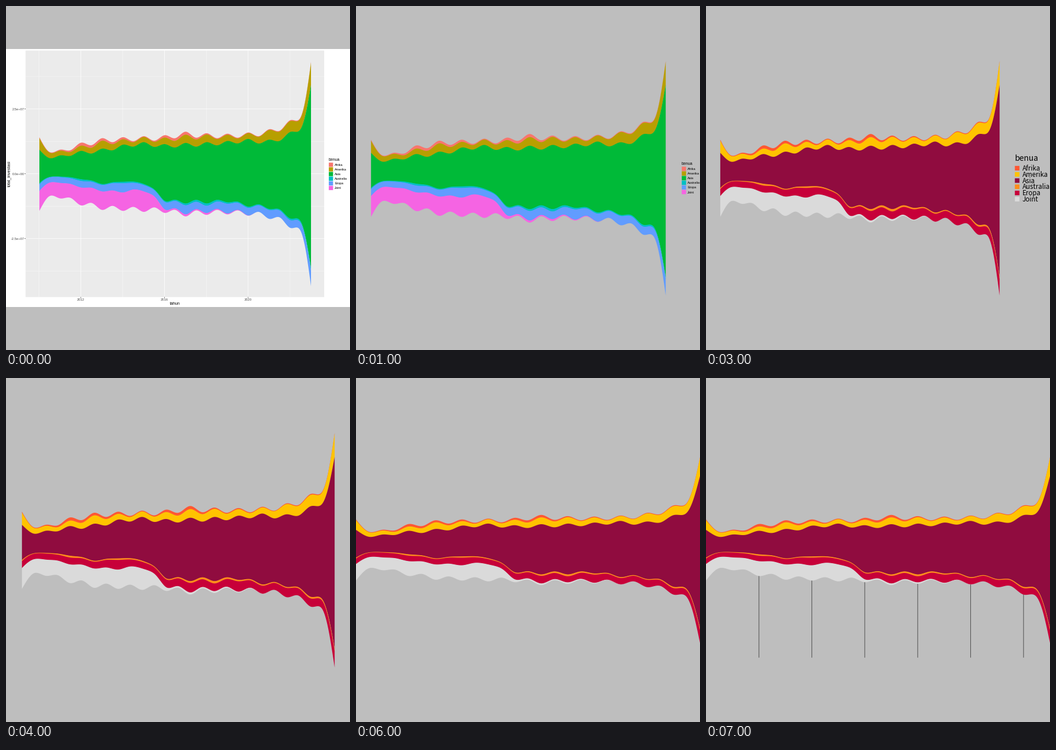
A matplotlib script that plays this animation: 600x600 px, repeating every 8 s.

```python
import numpy as np
import matplotlib.pyplot as plt
from matplotlib.animation import FuncAnimation
from matplotlib.patches import Rectangle

SIZE, DPI = 600, 100
GREY = "#BEBEBE"
NAMES = ["Afrika", "Amerika", "Asia", "Australia", "Eropa", "Joint"]
HUES = ["#F8766D", "#B79F00", "#00BA38", "#00BFC4", "#619CFF", "#F564E3"]
WARM = ["#FF5733", "#FFC300", "#900C3F", "#FF8D1A", "#C70039", "#DADADA"]
FIRST, LAST = 2010, 2023
PEAK = 43.2e6


def spline(x, knots, vals):
    """Natural cubic spline through (knots, vals)."""
    k, v = np.asarray(knots, float), np.asarray(vals, float)
    h, n = np.diff(k), len(k)
    m, rhs = np.eye(n), np.zeros(n)
    for i in range(1, n - 1):
        m[i, i - 1:i + 2] = h[i - 1], 2 * (h[i - 1] + h[i]), h[i]
        rhs[i] = 6 * ((v[i + 1] - v[i]) / h[i] - (v[i] - v[i - 1]) / h[i - 1])
    c = np.linalg.solve(m, rhs)
    i = np.clip(np.searchsorted(k, x) - 1, 0, n - 2)
    a, b, w = k[i + 1] - x, x - k[i], h[i]
    return ((c[i] * a**3 + c[i + 1] * b**3) / (6 * w)
            + (v[i] / w - c[i] * w / 6) * a
            + (v[i + 1] / w - c[i + 1] * w / 6) * b)


def even(vals):
    return spline(years, np.linspace(FIRST, LAST, len(vals)), vals)


years = np.linspace(FIRST, LAST, 1000)

# Half of the total height, 225 at its largest
half_knots = np.append(np.arange(FIRST, 2022.1, 0.5), [2022.25, 2022.5, 2022.75, 2023])
half = spline(years, half_knots, [
    74, 44, 49, 48, 63, 58, 72, 64, 74, 66, 76, 67, 78, 72, 85, 73, 82, 72,
    81, 73, 83.5, 76, 90, 87, 108, 107.5, 114, 154, 225]) / 225

# Borders between the bands as shares of the half height
amerika = even([.975, .96, .905, .93, .945, .98, .94, .93, .97, .975, .985,
                .985, .984, .994])
asia = even([.66, .765, .738, .708, .797, .842, .77, .735, .78, .82, .844,
             .767, .782, .796])
australia = even([-.25, -.13, -.102, -.135, -.165, -.225, -.278, -.258, -.21,
                  -.23, -.263, -.46, -.69, -.715, -.695, -.71, -.72, -.72,
                  -.70, -.76, -.785, -.80, -.78, -.815, -.825, -.832, -.84])
eropa = australia - even([.03, .025, .055, .025, .04, .028, .026, .042, .055,
                          .035, .028, .022, .03, .02])
joint = even([-.46, -.39, -.365, -.415, -.43, -.475, -.485, -.515, -.50, -.47,
              -.46, -.67, -.91, -.955, -.952, -.965, -.955, -.97, -.98, -.985,
              -.995] + [-1] * 6)
joint = np.maximum(joint, -1)
one = np.ones_like(years)
borders = half * np.array([one, amerika, asia, australia, eropa, joint, -one])

fig = plt.figure(figsize=(SIZE / DPI, SIZE / DPI), dpi=DPI, facecolor=GREY)
ax = fig.add_axes([0, 0, 1, 1])


def text(x, y, s, px, color="black", font="Liberation Sans", **kw):
    ax.text(x, y, s, fontsize=px * 72 / DPI, color=color, family=font,
            **{"va": "baseline", **kw})


def line(xs, ys, px, color, z=1):
    ax.plot(xs, ys, color=color, lw=px * 72 / DPI, solid_capstyle="butt",
            zorder=z, snap=False)


def box(x0, y0, x1, y1, color):
    ax.add_patch(Rectangle((x0, y0), x1 - x0, y1 - y0, fc=color, lw=0, snap=False))


def year_x(year, x0, x1):
    return x0 + (year - FIRST) / (LAST - FIRST) * (x1 - x0)


def stream(x0, x1, mid, tall, colors):
    x = year_x(years, x0, x1)
    y = mid - tall * borders
    for top, low, color in zip(y, y[1:], colors):
        # small overlap hides seams between bands
        ax.fill_between(x, top, np.minimum(low + 0.5, y[-1]), color=color, lw=0, zorder=3)


def legend(x, title_y, first, step, key, gap, px, title_px, colors,
           font="Liberation Sans", back=None):
    text(x, title_y, "benua", title_px, font=font)
    for i, (name, color) in enumerate(zip(NAMES, colors)):
        y = first + i * step
        if back:
            box(x, y - step / 2, x + step, y + step / 2, back)
        left = x + 0.4
        box(left, y - key / 2, left + key, y + key / 2, color)
        text(x + gap, y + 0.36 * px, name, px, font=font)


def chart():
    x0, x1, mid, tall = 57.7, 531.5, 292.6, 195.4
    left, right, top, low = 34.2, 555, 77.7, 507.6
    unit = tall / PEAK
    box(0, 75, SIZE, 525, "white")
    box(left, top, right, low, "#EBEBEB")
    for year in range(2010, 2023, 2):
        x = year_x(year, x0, x1)
        major = year % 4 == 0
        line([x, x], [top, low], 0.75 if major else 0.38, "white")
        if major:
            line([x, x], [low, low + 1.8], 0.75, "#333333")
            text(x, 514, str(year), 5.85, "#4D4D4D", ha="center")
    for k in range(-3, 4):
        y = mid - k * 1.25e7 * unit
        major = k % 2 == 0
        line([left, right], [y, y], 0.75 if major else 0.38, "white")
        if major:
            line([left - 1.8, left], [y, y], 0.75, "#333333")
            text(31.8, y + 2.1, f"{k * 1.25e7:.1e}", 5.85, "#4D4D4D", ha="right")
    text(294.6, 521, "tahun", 7.1, ha="center")
    text(5.4, mid, "total_investasi", 7.1, ha="center", va="center", rotation=90)
    stream(x0, x1, mid, tall, HUES)
    legend(562.7, 269.8, 276.9, 8.1, 7.3, 10.3, 5.8, 7, HUES, back="#F2F2F2")


def bare():
    stream(25.7, 539.7, 300, 204.5, HUES)
    legend(567.8, 276.8, 284, 8.1, 7.5, 10.4, 5.8, 7, HUES)


def big_legend(colors):
    stream(24.4, 511.6, 300, 204.5, colors)
    legend(538.3, 270, 282.9, 10.8, 8, 13.8, 11.6, 13.9, colors,
           font="Noto Sans CJK JP")


def no_legend():
    stream(27.3, 572.7, 300, 204.5, WARM)


def full():
    stream(0, SIZE, 300, 225, WARM)


def lowered():
    stream(0, SIZE, 300, 162, WARM)


def marked():
    for year in range(2012, 2023, 2):
        x = year_x(year, 0, SIZE)
        line([x, x], [300, 487.7], 1, "#4D4D4D", z=2)
    lowered()


SCENES = [chart, bare, lambda: big_legend(HUES), lambda: big_legend(WARM),
          no_legend, full, lowered, marked]


def draw(i):
    ax.clear()
    ax.set(xlim=(0, SIZE), ylim=(SIZE, 0), autoscale_on=False)
    ax.axis("off")
    SCENES[i]()
    return []


anim = FuncAnimation(fig, draw, frames=len(SCENES), interval=1000,
                     init_func=lambda: [], repeat=True, repeat_delay=0)
plt.show()
```
